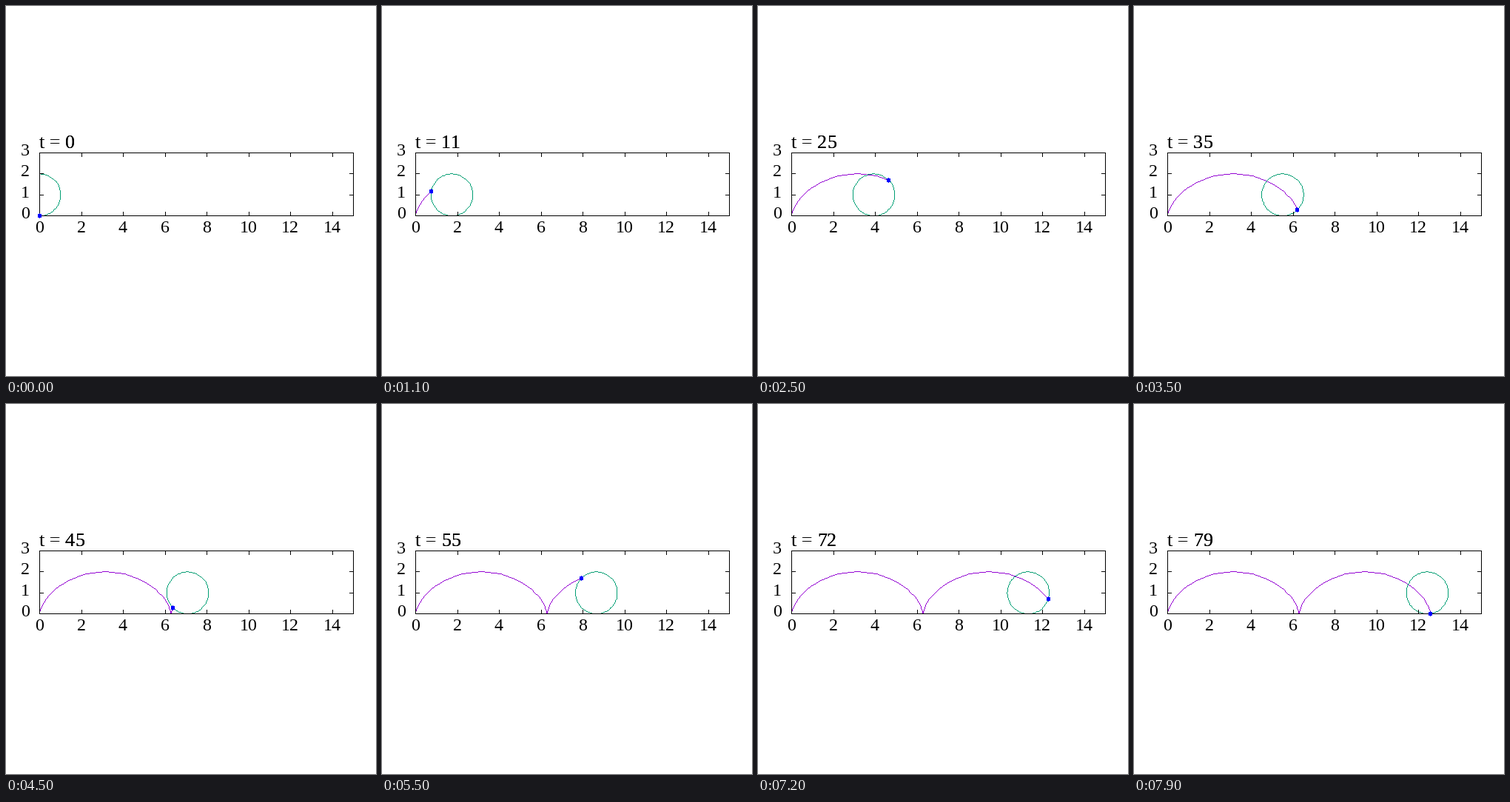
A matplotlib script for the animation above (8 s loop, 500 px wide and 500 px high).

```python
import numpy as np
import matplotlib.pyplot as plt
from matplotlib.animation import FuncAnimation

SIZE = 500
FRAMES = 80
LEFT, RIGHT, TOP, BOTTOM = 45, 469, 198, 283
X_MAX, Y_MAX = 15, 3
STEP = np.pi / 20
PURPLE, GREEN, BLUE, BLACK = (148, 0, 211), (0, 158, 115), (0, 0, 255), (0, 0, 0)
PT = 0.72  # points per pixel at 100 dpi
LABEL_PX, TITLE_PX = 24, 26

plt.rcParams["font.family"] = "Liberation Serif"


def to_px(x, y):
    """Data coordinates to whole pixels."""
    col = LEFT + np.asarray(x) * (RIGHT - LEFT) / X_MAX
    row = BOTTOM - np.asarray(y) * (BOTTOM - TOP) / Y_MAX
    return np.floor(col + 0.5).astype(int), np.floor(row + 0.5).astype(int)


def draw_curve(canvas, x, y, color):
    """One-pixel polyline without smoothing, clipped to the plot box."""
    cols, rows = to_px(x, y)
    for c0, r0, c1, r1 in zip(cols, rows, cols[1:], rows[1:]):
        n = max(abs(c1 - c0), abs(r1 - r0)) + 1
        c = np.floor(np.linspace(c0, c1, n) + 0.5).astype(int)
        r = np.floor(np.linspace(r0, r1, n) + 0.5).astype(int)
        ok = (c >= LEFT) & (c <= RIGHT) & (r >= TOP) & (r <= BOTTOM)
        canvas[r[ok], c[ok]] = color


def draw_frame(canvas):
    """Border with inward tick marks on all sides."""
    canvas[[TOP, BOTTOM], LEFT:RIGHT + 1] = BLACK
    canvas[TOP:BOTTOM + 1, [LEFT, RIGHT]] = BLACK
    for x in range(2, X_MAX, 2):
        c = to_px(x, 0)[0]
        canvas[TOP:TOP + 6, c] = BLACK
        canvas[BOTTOM - 5:BOTTOM + 1, c] = BLACK
    for y in range(1, Y_MAX):
        r = to_px(0, y)[1]
        canvas[r, LEFT:LEFT + 6] = BLACK
        canvas[r, RIGHT - 5:RIGHT + 1] = BLACK


def draw_dot(canvas, x, y):
    c, r = to_px(x, y)
    canvas[r - 2:r + 3, c - 2:c + 3] = BLUE
    canvas[r - 3:r + 4, c] = BLUE


def cycloid(a):
    return a - np.sin(a), 1 - np.cos(a)


def render(step):
    angle = step * STEP
    canvas = np.full((SIZE, SIZE, 3), 255, dtype=np.uint8)
    draw_curve(canvas, *cycloid(np.arange(step + 1) * STEP), PURPLE)
    turn = np.linspace(0, 2 * np.pi, 100)
    draw_curve(canvas, angle + np.cos(turn), 1 + np.sin(turn), GREEN)
    draw_frame(canvas)
    draw_dot(canvas, *cycloid(angle))
    return canvas


fig = plt.figure(figsize=(SIZE / 100, SIZE / 100), dpi=100, facecolor="white")
ax = fig.add_axes([0, 0, 1, 1])
ax.axis("off")
image = ax.imshow(render(0), extent=(0, SIZE, SIZE, 0), aspect="auto",
                  interpolation="nearest")
ax.set_xlim(0, SIZE)
ax.set_ylim(SIZE, 0)


def label(x, y, text, size=LABEL_PX, ha="left"):
    return ax.text(x, y, text, fontsize=size * PT, ha=ha, va="baseline")


for x in range(0, X_MAX, 2):
    label(to_px(x, 0)[0], 306, str(x), ha="center")
for y in range(Y_MAX + 1):
    label(32, to_px(0, y)[1] + 4, str(y), ha="right")

# The title is overprinted for weight; digits sit on a half-em pitch, unkerned.
PREFIX_EM = 1.342
digits = []
for _ in range(2):
    label(LEFT, 192, "t = ", TITLE_PX)
    digits.append([label(LEFT + TITLE_PX * (PREFIX_EM + k / 2), 192, "", TITLE_PX)
                   for k in range(2)])


def update(step):
    image.set_data(render(step))
    for pair in digits:
        for artist, char in zip(pair, f"{step:<2}"):
            artist.set_text(char.strip())
    return [image]


anim = FuncAnimation(fig, update, frames=FRAMES, interval=100,
                     repeat=True, repeat_delay=0, blit=False)
plt.show()
```
